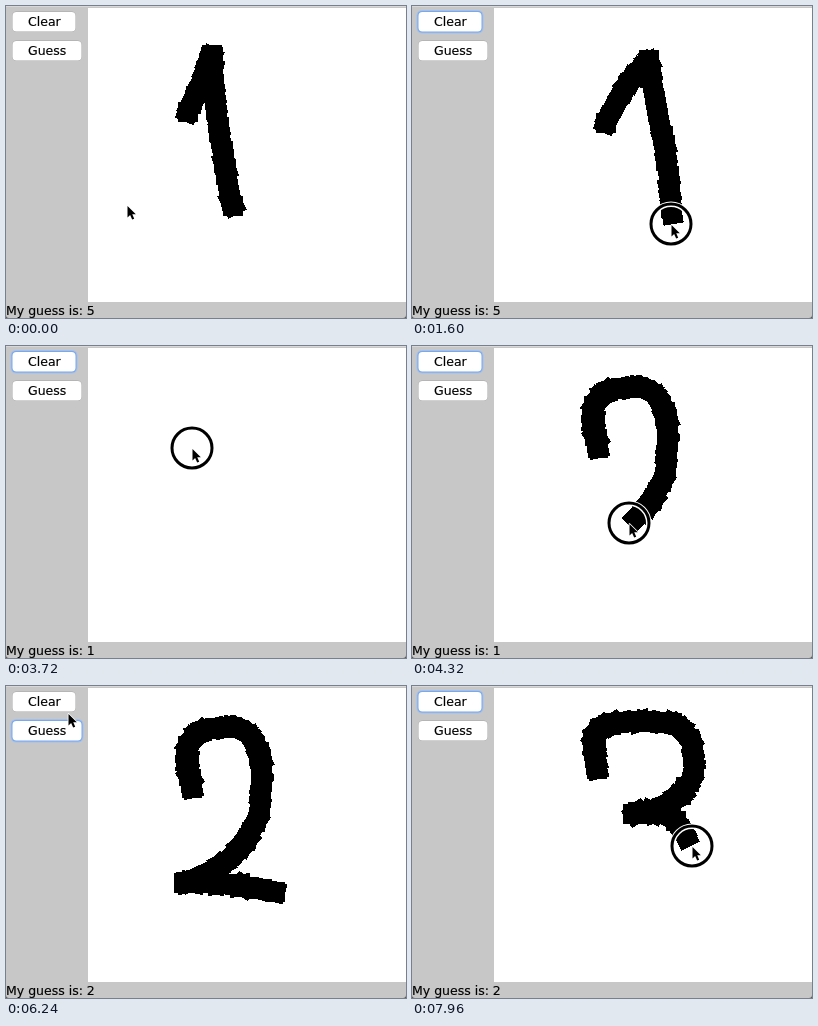
An HTML page that plays this animation: 400x312 px, repeating every 8000 ms.

```html
<!DOCTYPE html>
<html lang="en">
<head>
<meta charset="utf-8">
<title>Digit guesser</title>
<style>
  html, body { margin: 0; width: 100%; height: 100%; overflow: hidden; background: #c7c7c7; }
  svg { display: block; width: 400px; height: 312px; }
  text { font: 12.5px "DejaVu Sans", sans-serif; fill: #000; stroke: #000; stroke-width: 0.15; }
</style>
</head>
<body>
<svg viewBox="0 0 400 312">
  <rect width="400" height="312" fill="#c7c7c7"/>
  <rect width="400" height="1" fill="#d8d8d8"/>
  <rect x="82" y="2" width="318" height="294" fill="#fff"/>
  <path id="ink" fill="none" stroke="#000" stroke-width="20.5" stroke-linecap="square" shape-rendering="crispEdges"/>
  <g id="buttons"></g>
  <text id="guess" x="0" y="309"></text>
  <path d="M0 309v3h3q-3 0-3-3M400 309v3h-3q3 0 3-3" fill="#555"/>
  <g id="pointer">
    <g id="ring" fill="none">
      <circle r="19.75" stroke="#fff" stroke-width="5.5"/>
      <circle r="20" stroke="#000" stroke-width="3"/>
    </g>
    <path transform="translate(.5 1) scale(.85)" d="M0 0V13.6L3.1 10.7L5.5 16L7.9 15L5.6 9.8H9.8Z" stroke="#fff" stroke-width="2" paint-order="stroke" stroke-linejoin="round"/>
  </g>
</svg>
<script>
const LOOP = 8000;
const EVENT_MS = 10;   // time between mouse samples
const CLICK_MS = 100;
const LAG = 12;        // pixels the ink trails the pointer
const CLEAR = [60, 19];
const GUESS = [66, 52];
const $ = id => document.getElementById(id);

function make(parent, tag, attrs) {
  const el = document.createElementNS("http://www.w3.org/2000/svg", tag);
  for (const key in attrs) el.setAttribute(key, attrs[key]);
  if (parent) parent.appendChild(el);
  return el;
}

function makeButton(label, y, width) {
  const box = (grow, rx, fill) => make($("buttons"), "rect", {
    x: 6.5 - grow, y: y - grow, width: width + 2 * grow, height: 19.5 + 2 * grow, rx, fill });
  box(0.5, 4.5, "#a4a4a4");
  const halo = make($("buttons"), "g", {});
  halo.append(box(2, 5.5, "#a5c0e8"), box(1, 4.5, "#78a8ee"));
  box(0, 4, "#fff");
  make($("buttons"), "text", { x: 22, y: y + 14 }).textContent = label;
  return halo;
}

const clearHalo = makeButton("Clear", 6, 63);
const guessHalo = makeButton("Guess", 35, 69);

// Deterministic noise in -1..1
function noise(n) {
  const v = Math.sin(n * 127.1 + 11.7) * 43758.5453;
  return 2 * (v - Math.floor(v)) - 1;
}

// Ink is a chain of square-capped segments between mouse samples,
// with an upright square at each knot, where the hand slows down.
function makeInk(d, duration) {
  const path = make(null, "path", { d });
  const length = path.getTotalLength();
  const count = Math.round(duration / EVENT_MS);
  const spots = Array.from({ length: count + 1 }, (_, i) => {
    const p = path.getPointAtLength(length * i / count);
    return [Math.round(p.x + 0.7 * noise(2 * i)), Math.round(p.y + 0.7 * noise(2 * i + 1))];
  });
  const parts = spots.slice(1).map((p, i) => `M${spots[i]}L${p}`);
  const knots = d.match(/[\d.]+ [\d.]+(?=[A-Z]|$)/g).map(k => k.split(" ").map(Number));
  for (const [x, y] of knots) {
    const gaps = spots.slice(0, count).map(p => Math.hypot(p[0] - x, p[1] - y));
    parts[gaps.indexOf(Math.min(...gaps))] += `M${x} ${y}h.01`;
  }
  const at = u => {
    const p = path.getPointAtLength(length * u);
    return [p.x, p.y];
  };
  return { length, parts, at };
}

const earlier = makeInk("M182 106Q192 84 206 49Q208 100 217 145Q221 180 227 200", 400);

// Each round: leave for Clear, click it, draw, rest, click Guess
const rounds = [
  { leave: 40, clear: 340, start: 1140, end: 1600, rest: [2080, 66, 52], guess: 2240, reply: 1,
    d: "M194 117Q206 86 237 54Q242 95 251 130Q259 180 259.5 218" },
  { leave: 2760, clear: 3000, start: 3720, end: 4640, rest: [5040, 49, 75], guess: 5490, reply: 2,
    d: "M186 102C174 60 182 42 219 42C258 38 258 85 254 112C256 145 222 185 178 197Q225 195 269 206" },
  { leave: 6120, clear: 6470, start: 7110, end: 7960, rest: [8400, 66, 52], guess: 8600, reply: 3,
    d: "M185 83C176 42 185 36 230 36C275 32 282 52 282 78C280 112 245 127 221 128Q250 122 264 135L280 160" }
];

const stops = [[0, 121, 199]];
for (const r of rounds) {
  r.ink = makeInk(r.d, r.end - r.start);
  const first = r.ink.at(0);
  stops.push(
    [r.leave, ...stops[stops.length - 1].slice(1)],
    [r.leave + 180, ...CLEAR], [r.clear + CLICK_MS, ...CLEAR],
    [r.start - 80, ...first], [r.start, ...first],
    [r.end + 20, ...r.ink.at(1)], r.rest,
    [r.guess, ...GUESS], [r.guess + CLICK_MS, ...GUESS]);
}

const progress = (r, t) => Math.min(1, (t - r.start) / (r.end - r.start));

function pointerAt(t) {
  const r = rounds.find(r => t >= r.start && t <= r.end);
  if (r) return r.ink.at(progress(r, t));
  const i = stops.findIndex(s => s[0] > t);
  const [a, b] = [stops[i - 1], stops[i]];
  const u = (t - a[0]) / (b[0] - a[0]);
  const e = u * u * (3 - 2 * u);
  return [1, 2].map(k => a[k] + (b[k] - a[k]) * e);
}

function inkAt(t) {
  const r = rounds.findLast(r => t >= r.clear + CLICK_MS);
  if (!r) return earlier.parts.join("");
  const { length, parts } = r.ink;
  const lag = t > r.end + 20 ? 0 : LAG;
  const n = Math.ceil((progress(r, t) - lag / length) * parts.length);
  return parts.slice(0, Math.max(0, n)).join("");
}

function isPressed(t) {
  const held = (from, to) => t >= from && t < to;
  return rounds.some(r => held(r.clear, r.clear + CLICK_MS)
    || held(r.start - 40, r.end + 20)
    || held(r.guess, r.guess + CLICK_MS - 30));
}

function show(el, on) {
  el.setAttribute("visibility", on ? "visible" : "hidden");
}

function draw(t) {
  const current = rounds.findLast(r => t >= r.clear);
  const answered = rounds.findLast(r => t >= r.guess + CLICK_MS - 40);
  const guessing = current && t >= current.guess;
  show(clearHalo, current && !guessing);
  show(guessHalo, guessing);
  show($("ring"), isPressed(t));
  $("ink").setAttribute("d", inkAt(t));
  $("guess").textContent = "My guess is: " + (answered ? answered.reply : 5);
  $("pointer").setAttribute("transform", `translate(${pointerAt(t).map(Math.round)})`);
}

const begin = performance.now();
function tick() {
  draw((performance.now() - begin) % LOOP);
  requestAnimationFrame(tick);
}
draw(0);
requestAnimationFrame(tick);
</script>
</body>
</html>
```
